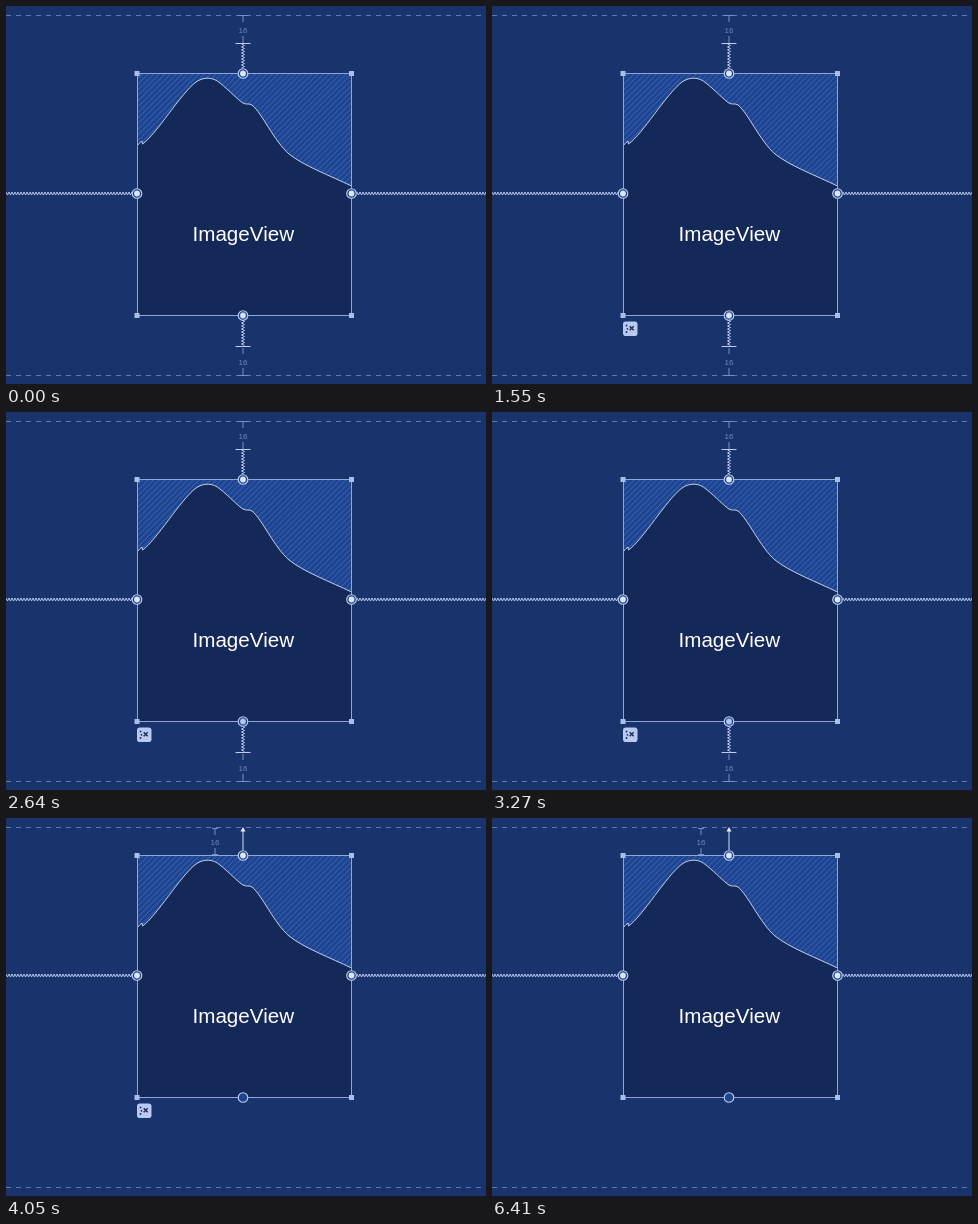
Recreate the animation shown at these times as an HTML page. Size 480x378 px, loop 6.46 s.

```html
<!DOCTYPE html>
<html lang="en">
<head>
<meta charset="utf-8">
<title>Deleting a constraint</title>
<style>
  html, body { margin: 0; width: 100%; height: 100%; overflow: hidden; background: #19336d; }
  svg { display: block; width: 480px; height: 378px; }
  text { font-family: "Liberation Sans", Arial, sans-serif; text-anchor: middle; }
  path, line { fill: none; }
  .guide { stroke: #6179ab; stroke-dasharray: 5 5; }
  .margin path { stroke: #7890c0; }
  .margin text { font-size: 8px; fill: #7188b8; }
  .margin .stop { stroke: #c0cdeb; }
  .spring { stroke: #b9c8ea; }
  .edge { fill: none; stroke: #8fa6d6; }
  .corner { fill: #a9bfe9; }
  .ring { fill: #1d448f; stroke: #c3d1f0; stroke-width: 1.1; }
  .dot { fill: #dde7fb; }
  #after { opacity: 0; }
  #flash, #icon, #warn, #hover { opacity: 0; }
</style>
</head>
<body>
<svg viewBox="0 0 480 378">
  <defs>
    <pattern id="hatch" width="4" height="4" patternUnits="userSpaceOnUse" patternTransform="rotate(45)">
      <rect width="4" height="4" fill="#1d4493"/>
      <rect width="1" height="4" fill="#375da5"/>
    </pattern>
    <g id="anchor">
      <circle class="ring" r="4.8"/>
      <circle class="dot" r="2.9"/>
    </g>
  </defs>

  <rect width="480" height="378" fill="#19336d"/>
  <rect id="flash" y="9" width="480" height="369" fill="#152959"/>
  <line class="guide" x2="480" y1="9.5" y2="9.5"/>
  <line class="guide" x2="480" y1="369.5" y2="369.5"/>

  <g id="before">
    <g class="margin">
      <path d="M232 9.5h10M237 10v6M237 30v7M237 342v6M237 362v7M232 369.5h10"/>
      <path class="stop" d="M229.500 37.500h15M229.500 340.500h15"/>
      <text x="237" y="27">16</text>
      <text x="237" y="359">16</text>
    </g>
    <path class="spring" data-spring="237 38 62 v"/>
    <path class="spring" data-spring="237 314 340 v"/>
  </g>

  <g id="after">
    <g class="margin">
      <path d="M206 10.500h6M209 11v6M209 30v6M206 36.500h6"/>
      <text x="209" y="27">16</text>
    </g>
    <path d="M237 32V13" stroke="#d5dff5"/>
    <path d="M237 9l2.500 4.500h-5z" style="fill:#e6edfc"/>
  </g>

  <g id="widget">
    <path class="spring" data-spring="187.5 0 126 h"/>
    <path class="spring" data-spring="187.5 351 480 h"/>
    <rect x="131.500" y="67.500" width="214" height="242" fill="url(#hatch)"/>
    <path id="hill" style="fill:#152959"/>
    <path id="ridge" stroke="#c3d0ee"/>
    <rect class="edge" x="131.500" y="67.500" width="214" height="242"/>
    <g id="corners"></g>
    <text x="237.300" y="235" font-size="20.6" fill="#fff">ImageView</text>

    <g id="icon">
      <rect x="131" y="315.500" width="14.500" height="14.500" rx="2.800" fill="#b9caee"/>
      <path d="M137.700 320.300l4 4m0-4l-4 4" stroke="#182c60" stroke-width="1.400"/>
      <g fill="#182c60">
        <circle cx="134.500" cy="319.500" r=".9"/>
        <circle cx="135.500" cy="322.800" r=".9"/>
        <circle cx="134.500" cy="326" r=".9"/>
      </g>
    </g>

    <use href="#anchor" x="237" y="67.500"/>
    <use href="#anchor" x="131" y="187.500"/>
    <use href="#anchor" x="345.500" y="187.500"/>
    <g transform="translate(237 309.500)">
      <circle class="ring" r="4.800"/>
      <circle id="bottomDot" class="dot" r="2.900"/>
      <circle id="warn" r="6" fill="none" stroke="#c8374c" stroke-width="1.200"/>
      <g id="hover">
        <circle r="6.800" fill="none" stroke="#152959" stroke-width="2"/>
        <circle r="7.300" fill="none" stroke="#fff" stroke-width="2.300"/>
      </g>
    </g>
  </g>
</svg>

<script>
const LOOP = 6460, HOVER = 2000, CUT = 3320, LEAVE = 4050;
const $ = id => document.getElementById(id);

function zigzag(axis, from, to, dir) {
  const pts = [];
  for (let p = from, i = 0; p <= to; p += 1.5, i++) {
    const q = axis + (i % 2 ? 1.5 : -1.5);
    pts.push(dir === 'v' ? `${q} ${p}` : `${p} ${q}`);
  }
  return 'M' + pts.join('L');
}

for (const el of document.querySelectorAll('[data-spring]')) {
  const [axis, from, to, dir] = el.dataset.spring.split(' ');
  el.setAttribute('d', zigzag(+axis, +from, +to, dir));
}

const ridge = 'M131.5 139.5L134 136.5L136 135L136.5 138C150 129 175 87 190 76' +
  'C198 70.500 207 71 214 77C224 85 232 94 237 97C240 99 243 97 246 99' +
  'C256 107 268 135 283 148C298 160 325 170 345.5 180';
$('ridge').setAttribute('d', ridge);
$('hill').setAttribute('d', ridge + 'V309.5H131.5Z');

$('corners').innerHTML = [131, 345.5].flatMap(x => [67.5, 309.5].map(y =>
  `<rect class="corner" x="${x - 2.5}" y="${y - 2.5}" width="5" height="5"/>`)).join('');

// Each step is [time in ms, value]; two steps at one time make a cut.
function play(id, prop, steps) {
  const last = steps.length - 1;
  const all = [[0, steps[0][1]], ...steps, [LOOP, steps[last][1]]];
  $(id).animate(all.map(([t, v]) => ({ offset: t / LOOP, [prop]: v })),
    { duration: LOOP, iterations: Infinity });
}

play('before', 'opacity', [[CUT, 1], [CUT, 0]]);
play('after', 'opacity', [[CUT, 0], [CUT, 1]]);
play('widget', 'transform', [[CUT, 'translate(0px, 0px)'], [CUT, 'translate(0px, -30px)']]);
play('flash', 'opacity', [[CUT, 0], [CUT, 1], [CUT + 40, 1], [CUT + 250, 0]]);
play('icon', 'opacity', [[150, 0], [500, 1], [5050, 1], [5400, 0]]);
play('bottomDot', 'fill', [[HOVER, '#dde7fb'], [HOVER + 500, '#b4c8ef'], [CUT, '#b4c8ef']]);
play('bottomDot', 'opacity', [[CUT, 1], [CUT, 0]]);
play('warn', 'opacity', [[HOVER, 0], [HOVER + 50, .5], [HOVER + 300, .6], [HOVER + 600, 0],
  [HOVER + 900, .6], [HOVER + 1200, 0]]);
play('warn', 'transform', [[HOVER, 'scale(.85)'], [HOVER + 600, 'scale(1.5)'],
  [HOVER + 600, 'scale(.85)'], [HOVER + 1200, 'scale(1.5)']]);
play('hover', 'opacity', [[CUT, 0], [CUT, 1], [CUT + 300, .9], [LEAVE - 50, 0]]);
</script>
</body>
</html>
```
